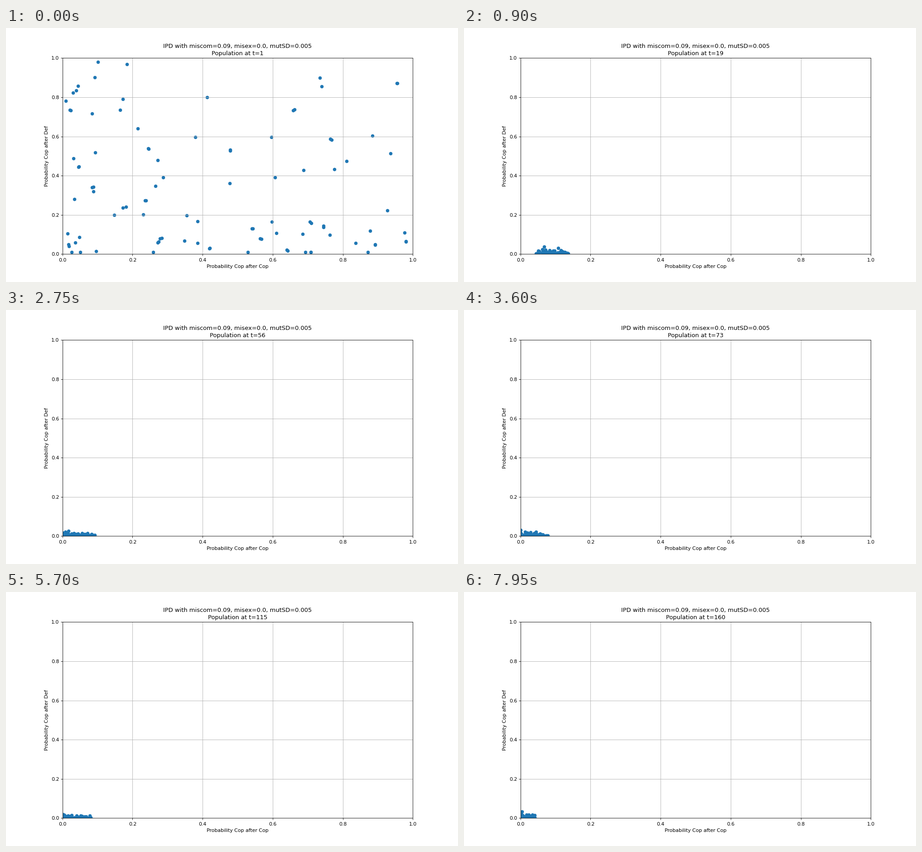
Animation, 998 px wide and 561 px high, one loop 8000 ms. Source, as a matplotlib script:

```python
import numpy as np
import matplotlib.pyplot as plt
from matplotlib.animation import FuncAnimation

STEPS = 160
FOUNDERS = 75
CLONES = 23
MUT_SD = 0.005
ANCESTOR = (0.096, 0.014)   # the strategy that takes over

rng = np.random.default_rng(11)

# Founders lean towards defection; some already have a mutated copy
founders = rng.random((FOUNDERS, 2)) ** [1.25, 1.4]
founders[0] = ANCESTOR
copies = founders[-CLONES:] + rng.normal(0, MUT_SD, (CLONES, 2))
start = np.clip(np.vstack([founders, copies]), 0.01, 0.98)
count = len(start)

# The most cooperative strategies die out first
score = start @ [0.3, 1.0] + rng.normal(0, 0.08, count)
rank = np.argsort(np.argsort(-score))
death = 2 + rank // 10
lifetime = rng.integers(4, 10, count)


def newborn(slot, birth):
    """Strategy born into a slot: a cluster drifting towards full defection."""
    gen = np.random.default_rng([slot, birth])
    low = np.interp(birth, [1, 19, 36], [0.09, 0.04, 0])
    reach = np.interp(birth, [1, 19, 56, 91, 115, 138],
                      [0.102, 0.137, 0.087, 0.066, 0.083, 0.041])
    power = np.interp(birth, [19, 56], [0.7, 1.9])
    height = np.interp(birth, [19, 56], [0.008, 0.006])
    u = gen.random() ** power
    return low + (reach - low) * u, gen.exponential(height) * (1 - 0.4 * u)


def population(t):
    pts = start.copy()
    for i in np.flatnonzero(death <= t):
        age = (t - death[i]) % lifetime[i]
        pts[i] = newborn(i, int(t - age))
    return pts


fig, ax = plt.subplots(figsize=(12.795, 7.1925), dpi=78)
fig.subplots_adjust(top=0.8815)
dots = ax.scatter(*start.T, color="#1f77b4")
ax.set(xlim=(0, 1), ylim=(0, 1),
       xlabel="Probability Cop after Cop", ylabel="Probability Cop after Def")
ax.tick_params(axis="x", pad=4.2)
ax.grid(True)


def draw(frame):
    t = frame + 1
    dots.set_offsets(population(t))
    ax.set_title("IPD with miscom=0.09, misex=0.0, mutSD=0.005\n"
                 f"Population at t={t}", linespacing=1.28)
    return dots,


anim = FuncAnimation(fig, draw, frames=STEPS, interval=50,
                     repeat=True, repeat_delay=0)
plt.show()
```
